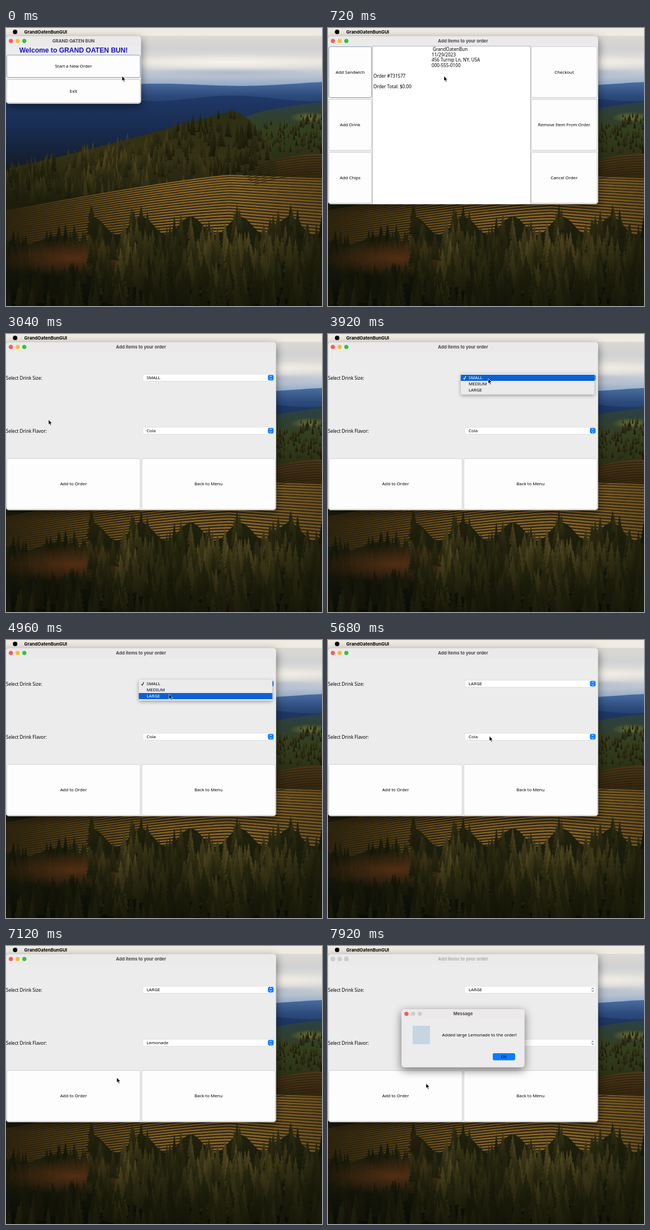
Animation, 564 px wide and 498 px high, one loop 8 s. Source, as an HTML page with a canvas:

```html
<!DOCTYPE html>
<html lang="en">
<head>
<meta charset="utf-8">
<title>Sandwich order</title>
<style>
html, body { margin: 0; width: 100%; height: 100%; overflow: hidden; background: #11150c; }
canvas, svg { position: absolute; left: 0; top: 0; width: 564px; height: 498px; }
text { font: 500 7.8px "Noto Sans", "Open Sans", sans-serif; fill: #000; white-space: pre; }
.btn { text-anchor: middle; }
.label { font-size: 8.1px; }
.bar { font: 700 7.8px Inter, Roboto, sans-serif; fill: #4b494a; text-anchor: middle; }
.menu { font: 700 8px Inter, Roboto, sans-serif; }
.hello { font: 700 12.1px "Liberation Sans", Arial, sans-serif; fill: #1d10c4; text-anchor: middle; }
.shadow { filter: drop-shadow(0 5px 8px rgba(0,0,0,.5)); }
.pop { filter: drop-shadow(0 2px 3px rgba(0,0,0,.35)); }
</style>
</head>
<body>
<canvas id="land" width="564" height="498"></canvas>
<svg id="ui" viewBox="0 0 564 498"></svg>
<script>
const LOOP = 8000, STEP = 80, W = 564, H = 498;

/* ---------- landscape ---------- */
const c = document.getElementById('land').getContext('2d');
let seed = 7;
const rnd = () => (seed = (seed * 16807) % 2147483647) / 2147483647;
const span = (a, b) => a + (b - a) * rnd();
const bump = (v, mid, width) => Math.exp(-(((v - mid) / width) ** 2));

function blend(x0, y0, x1, y1, colors) {
  const g = c.createLinearGradient(x0, y0, x1, y1);
  colors.forEach((s, i) => g.addColorStop(i / (colors.length - 1), s));
  return g;
}
const down = (y0, y1, ...colors) => blend(0, y0, 0, y1, colors);
const across = (...colors) => blend(0, 0, W, 0, colors);

function curve(fn, x0 = 0, x1 = W) {
  c.beginPath();
  for (let x = x0; x <= x1; x += 4) c.lineTo(x, fn(x));
}
function hill(fn, fill, x0, x1 = W) {
  curve(fn, x0, x1);
  c.lineTo(x1, H);
  c.lineTo(x0 || 0, H);
  c.fillStyle = fill;
  c.fill();
}
function glow(x, y, rx, ry, rgb, alpha) {
  c.save();
  c.translate(x, y);
  c.scale(rx, ry);
  const g = c.createRadialGradient(0, 0, 0, 0, 0, 1);
  g.addColorStop(0, `rgba(${rgb},${alpha})`);
  g.addColorStop(1, `rgba(${rgb},0)`);
  c.fillStyle = g;
  c.fillRect(-1, -1, 2, 2);
  c.restore();
}
function tree(x, y, h, light) {
  const w = h * span(.16, .24), tiers = 6;
  c.beginPath();
  for (const side of [-1, 1]) {
    c.moveTo(x, y);
    for (let i = 1; i <= tiers; i++) {
      const f = i / tiers;
      c.lineTo(x + side * w * f * span(.85, 1.25), y + h * f);
      c.lineTo(x + side * w * f * .6, y + h * f);
    }
    c.lineTo(x, y + h);
  }
  const tone = l => `hsl(${68 - l} 44% ${l}%)`;
  c.fillStyle = blend(x - w, y, x + w, y + h, [tone(4 + 20 * light), tone(4 + 8 * light)]);
  c.fill();
}
// trees from back to front, lit by light(x, y)
function grove(n, x0, x1, top, bottom, h0, h1, light) {
  for (let i = 0; i < n; i++) {
    const x = span(x0, x1), y = top(x) + (bottom - top(x)) * i / n;
    tree(x, y, span(h0, h1), light(x, y) * span(.45, 1.2));
  }
}

const far = x => 106 + 3 * Math.sin(x / 55) - x / 80;
const mid = x => 126 + 5 * Math.sin(x / 45 + 2);
const green = x => 168 - 36 * Math.sqrt(Math.max(0, (x - 420) / 144));
const ridge = x => x < 400 ? 238 - 103 * (x / 400) ** 1.1 : 135 + (x - 400) ** 2 / 70;
const crest = x => x < 400 ? 263 + 64 * (1 - x / 400) ** 1.2 : 263 + (x - 400) / 27;
const wood = x => x < 150 ? 352 + 8 * Math.sin(x / 20) : 326 + 16 * Math.sin(x / 14);

function land() {
  c.fillStyle = down(14, 108, '#dcd9d2', '#d0d1d3', '#e8e4dc', '#bcc5d1', '#86a3c6');
  c.fillRect(0, 0, W, 120);
  glow(400, 62, 220, 16, '250,246,238', .8);
  glow(400, 80, 190, 9, '160,174,194', .6);

  hill(far, down(95, 150, '#4c70a3', '#2b497a', '#213a63'));
  hill(mid, down(125, 240, '#1f3866', '#182b4f', '#141f2e'));
  hill(green, down(135, 230, '#2b4145', '#343f1e', '#2c3116'), 420);
  glow(542, 160, 36, 10, '118,124,50', .9);
  grove(110, 440, W, x => green(x) + 14, 212, 8, 16, () => .65);

  hill(x => 225 + 40 * ((W - x) / 150) ** 2, down(225, 268, '#4a3719', '#33260f'), 412);

  hill(x => ridge(x) + 14, down(150, 310, '#2c2e14', '#343214', '#1c1d0c'), 0, 484);
  const sun = (x, y) => .45 + .55 * bump(x, 210, 150) * bump(y, 220, 60);
  grove(420, 0, 470, ridge, 280, 16, 36, sun);

  // vineyard
  hill(crest, across('#30260f', '#5c4719', '#846427', '#856528', '#684e20'));
  c.strokeStyle = '#2a200d';
  for (let k = 0; k < 24; k++) {
    c.lineWidth = 1.4 + k / 20;
    curve(x => crest(x) + 3 + k * (3 + 2 * x / W) + k * k * .03);
    c.stroke();
  }
  c.strokeStyle = '#241b0c';
  c.lineWidth = 1;
  for (let k = 1; k < 9; k++) {
    curve(x => 225 + k * 4.5 + 30 * ((W - x) / 150) ** 2, 412 + k * 4);
    c.stroke();
  }

  // foreground wood
  hill(x => wood(x) + 28, down(350, H, '#1f200d', '#14170b', '#090c07'));
  const dusk = (x, y) => .2 + .8 * bump(y, 355, 70) * Math.max(bump(x, 210, 55), bump(x, 400, 130));
  grove(170, 0, W, wood, 405, 30, 62, dusk);
  glow(120, 412, 135, 34, '88,48,20', .9);
  grove(150, 150, W, () => 360, 425, 40, 70, dusk);
  grove(150, 0, W, () => 418, 475, 34, 66, dusk);
}
land();

/* ---------- interface ---------- */
const txt = (cls, x, y, s) => `<text class="${cls}" x="${x}" y="${y}">${s}</text>`;
const box = (x, y, w, h, r, fill, more = '') =>
  `<rect x="${x}" y="${y}" width="${w}" height="${h}" rx="${r}" fill="${fill}" ${more}/>`;
const group = (id, body) => `<g id="${id}">${body}</g>`;
const button = (x, y, w, h, s, line = '#d0d0d0') =>
  box(x + .5, y + .5, w - 1, h - 1, 2.5, '#fdfdfd', `stroke="${line}"`) +
  txt('btn', x + w / 2, y + h / 2 + 2.5, s);
const lights = (x, y, colors) =>
  colors.map((f, i) => `<circle cx="${x + i * 12}" cy="${y}" r="3.7" fill="${f}"/>`).join('');
const FOCUS = '#86a0b6', LIVE = ['#f35f57', '#f6bd30', '#2fc440'], IDLE = Array(3).fill('#cfcdce');
const panel = (x, y, w, h, bar, title) =>
  box(x, y, w, h, 5, '#ececec', 'class="shadow" stroke="#b5b5b5" stroke-width=".5"') +
  `<path d="M${x} ${y + bar}v${5 - bar}a5 5 0 0 1 5-5h${w - 10}a5 5 0 0 1 5 5v${bar - 5}Z" fill="#ece9ea"/>` +
  txt('bar', x + w / 2, y + bar / 2 + 2.6, title);
const frame = (w, h, title) => panel(0, 14.5, w, h, 18, title) + lights(8.7, 23.3, LIVE);
const column = (x, w, names, focused) => names.map((s, i) =>
  button(x, 33 + i * 94.6, w, 92, s, i === focused ? FOCUS : undefined)).join('');
const combo = (name, y) =>
  box(244, y - 6, 234, 12.5, 3, '#fff', 'stroke="#d2d2d2" stroke-width=".6"') +
  `<rect class="knob" x="467.5" y="${y - 4.8}" width="10" height="10" rx="2.4" fill="#0a7aff"/>` +
  `<path class="arrows" d="M470.6 ${y - 1}l1.9-2 1.9 2m-3.8 2.4l1.9 2 1.9-2" fill="none" stroke="#fff"/>` +
  `<text id="${name}" x="251" y="${y + 2.8}"></text>`;
const popup = (id, y, items) => group(id,
  box(237, y, 238.5, items.length * 11 + 4.5, 2.5, '#ebebeb', 'class="pop"') +
  box(237, y + 2, 238.5, 11, 0, '#0b62d6', 'class="hit"') +
  `<path class="tick" d="M241.7 ${y + 8}l1.6 2.2 2.6-5.6" fill="none" stroke="#111" stroke-width="1.1"/>` +
  items.map((s, i) => txt('item', 251, y + 10.2 + i * 11, s)).join(''));

const ui = document.getElementById('ui');
ui.innerHTML =
  box(0, 0, W, 14, 0, '#efebe2') +
  '<circle cx="16.3" cy="7" r="4"/>' +
  txt('menu', 32.5, 9.8, 'GrandOatenBunGUI') +

  group('welcome', frame(241, 121, 'GRAND OATEN BUN') +
    txt('hello', 120.5, 43.5, 'Welcome to GRAND OATEN BUN!') +
    button(1, 48, 239, 41, 'Start a New Order', FOCUS) +
    button(1, 92, 239, 42, 'Exit')) +

  group('order', frame(482, 301, 'Add items to your order') +
    column(1, 77, ['Add Sandwich', 'Add Drink', 'Add Chips'], 0) +
    box(79.5, 32.5, 282, 283, 0, '#fff', 'stroke="#b4b4b4"') +
    column(362.5, 118, ['Checkout', 'Remove Item From Order', 'Cancel Order']) +
    txt('label', 187, 41, 'GrandOatenBun') +
    ['11/29/2023', '456 Turnip Ln, NY, USA', '000-555-0100'].map((s, i) =>
      txt('label', 185, 50.8 + i * 9.6, s)).join('') +
    txt('label', 81, 89.2, 'Order #731577') +
    txt('label', 81, 108.4, 'Order Total: $0.00')) +

  group('drink', frame(482, 301, 'Add items to your order') +
    group('off', lights(8.7, 23.3, IDLE)) +
    txt('label', 0, 81.8, 'Select Drink Size:') +
    txt('label', 0, 176.6, 'Select Drink Flavor:') +
    combo('size', 78) + combo('flavor', 173) +
    button(1, 222.5, 239, 92, 'Add to Order') +
    button(242, 222.5, 239, 92, 'Back to Menu')) +
  popup('sizes', 71, ['SMALL', 'MEDIUM', 'LARGE']) +
  popup('flavors', 165.5, ['Cola', 'Orange', 'Lemonade', 'Iced Tea']) +

  group('message', panel(131, 113, 220, 104.5, 17, 'Message') +
    lights(140, 121.5, [LIVE[0], ...IDLE.slice(1)]) +
    box(151, 143, 31, 33, 0, '#c6d5e2') +
    txt('btn', 270.3, 161.5, 'Added large Lemonade to the order!') +
    box(294, 192, 40, 12.8, 3, '#0a7cff') +
    txt('btn', 314, 201.2, 'OK')) +

  group('cursor', '<path d="M0 0V9L2.1 7.2 3.6 10.7 5.1 10 3.6 6.7H6.4Z" stroke="#fff" stroke-width=".7"/>');

/* ---------- motion ---------- */
const $ = id => document.getElementById(id);
const show = (id, on) => $(id).style.display = on ? '' : 'none';
const ease = f => f * f * (3 - 2 * f);

const at = { order: 320, drink: 2800, sizes: 3600, large: 5200, flavors: 5760, lemonade: 6720, message: 7520 };
// each move: begin, end, x, y
const moves = [
  [1040, 2000, 37, 167], [2880, 3520, 286, 80], [4320, 4880, 291, 97],
  [5200, 5680, 288, 172], [5920, 6160, 289, 187], [6400, 6560, 290, 194], [6720, 7280, 175, 246]
];
function pointer(t) {
  let x = 207, y = 86;
  for (const [begin, end, toX, toY] of moves) {
    const e = ease(Math.min(1, Math.max(0, (t - begin) / (end - begin))));
    x += (toX - x) * e;
    y += (toY - y) * e;
  }
  return [x, y];
}
function menu(id, open, top, y) {
  show(id, open);
  if (!open) return;
  const g = $(id), items = g.querySelectorAll('.item');
  const row = Math.max(0, Math.min(items.length - 1, Math.floor((y - top - 2) / 11)));
  g.querySelector('.hit').setAttribute('y', top + 2 + row * 11);
  g.querySelector('.tick').style.stroke = row ? '#111' : '#fff';
  items.forEach((el, i) => el.style.fill = i === row ? '#fff' : '#000');
}
function draw(t) {
  const [x, y] = pointer(t), asked = t >= at.message;
  $('cursor').setAttribute('transform', `translate(${x.toFixed(2)} ${y.toFixed(2)})`);
  show('welcome', t < at.order);
  show('order', t >= at.order && t < at.drink);
  show('drink', t >= at.drink);
  menu('sizes', t >= at.sizes && t < at.large, 71, y);
  menu('flavors', t >= at.flavors && t < at.lemonade, 165.5, y);
  show('message', asked);
  show('off', asked);
  $('size').textContent = t < at.large ? 'SMALL' : 'LARGE';
  $('flavor').textContent = t < at.lemonade ? 'Cola' : 'Lemonade';
  $('drink').querySelector('.bar').style.fill = asked ? '#b0aeaf' : '';
  ui.querySelectorAll('.knob').forEach(k => k.style.opacity = asked ? 0 : 1);
  ui.querySelectorAll('.arrows').forEach(a => a.style.stroke = asked ? '#333' : '#fff');
}
const start = performance.now();
function tick() {
  const t = (performance.now() - start) % LOOP;
  draw(Math.floor(t / STEP) * STEP);
  requestAnimationFrame(tick);
}
tick();
</script>
</body>
</html>
```
